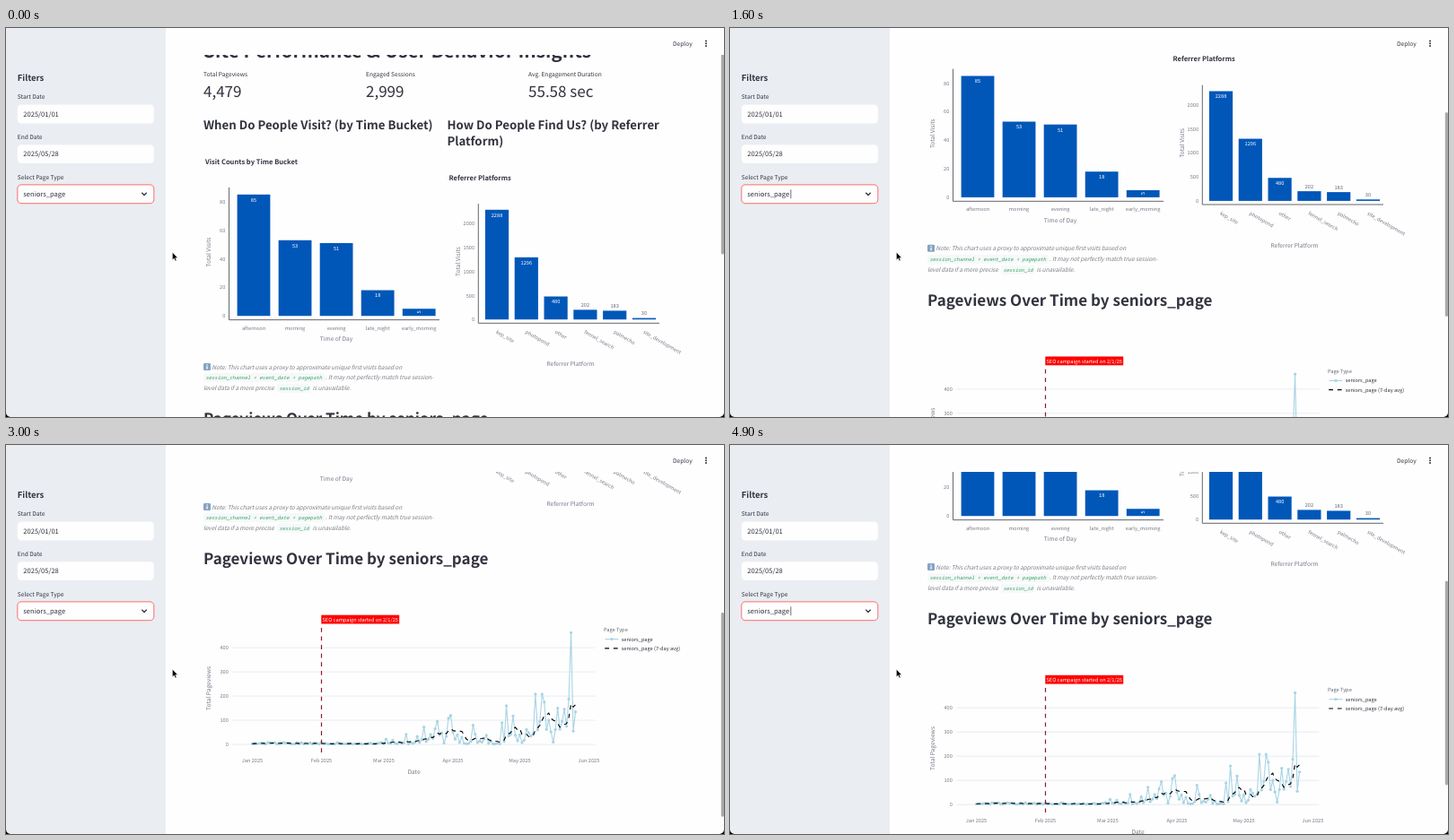
These frames come from a looping animation (800 by 434 pixels, 5 s). An HTML page:

```html
<!DOCTYPE html>
<html lang="en">
<head>
<meta charset="utf-8">
<title>Page analytics dashboard</title>
<style>
  html, body { margin: 0; width: 100%; height: 100%; overflow: hidden; background: #fff; }
  svg { display: block; width: 100vw; height: 100vh; }
  text {
    font-family: "Noto Sans CJK JP", "Noto Sans CJK SC", "Noto Sans CJK", "Open Sans", sans-serif;
    text-rendering: geometricPrecision;
    white-space: pre;
  }
  .note { font-style: italic; letter-spacing: -0.016em; }
  .code { font-family: "Noto Sans Mono", "Liberation Mono", monospace; font-style: italic; }
</style>
</head>
<body>
<svg id="stage" viewBox="0 0 800 434" xmlns="http://www.w3.org/2000/svg"></svg>
<script>
const NS = "http://www.w3.org/2000/svg";
const stage = document.getElementById("stage");
const INK = "#31333f", GRAY = "#767a88", BLUE = "#0057b8", SKY = "#a8d4e5";
const LOOP = 5000, STEP = 100;

// Type sizes in stage pixels
const XS = 6.35, SM = 7.41, MD = 8.47, LG = 10.6, H3 = 14.8, H2 = 19.05, H1 = 23.3;
const GLYPH_SCALE = 1.118;

function add(parent, tag, attrs) {
  const el = document.createElementNS(NS, tag);
  for (const key in attrs) el.setAttribute(key, attrs[key]);
  parent.appendChild(el);
  return el;
}

// Text placed by the vertical middle of its capitals
function label(parent, x, mid, str, size, opts = {}) {
  const { turn, ...rest } = opts;
  const y = mid + size * 0.33;
  const attrs = { x, y, "font-size": size / GLYPH_SCALE, fill: INK, ...rest };
  if (turn) attrs.transform = `rotate(${turn} ${x} ${mid})`;
  add(parent, "text", attrs).textContent = str;
}

const rect = (parent, x, y, width, height, fill, more) =>
  add(parent, "rect", { x, y, width, height, fill, ...more });

const stroke = (parent, d, color, width, more) =>
  add(parent, "path", { d, fill: "none", stroke: color, "stroke-width": width, ...more });

const bold = { "font-weight": 600 };
const heavy = { "font-weight": 700 };
const tick = { fill: GRAY, "text-anchor": "end" };
const axis = { fill: GRAY, "text-anchor": "middle" };

rect(stage, 0, 0, 800, 434, "#fefefe");
const page = add(stage, "g", {});

function drawMetrics() {
  label(page, 220, 25.8, "Site Performance & User Behavior Insights", H1, heavy);
  const metrics = [
    ["Total Pageviews", "4,479"],
    ["Engaged Sessions", "2,999"],
    ["Avg. Engagement Duration", "55.58 sec"]
  ];
  metrics.forEach(([name, value], i) => {
    label(page, 220 + i * 181, 52, name, SM);
    label(page, 220 + i * 181, 71, value, H2);
  });
}

function drawBars(c) {
  const topOf = v => c.zero - v * c.unit;
  c.bars.forEach(([name, value], i) => {
    const mid = c.first + i * c.step, top = topOf(value);
    rect(page, mid - c.width / 2, top, c.width, c.zero - top, BLUE);
    const outside = c.slant && value < 400;
    const narrow = !c.slant && value < 10;
    label(page, mid, narrow ? c.zero - 4.4 : top + (outside ? -5.3 : 5.8), value, XS, {
      fill: outside ? "#656874" : "#fff",
      "text-anchor": "middle",
      turn: narrow ? -90 : 0
    });
    if (c.slant) {
      label(page, mid - 0.5, 338.4, name, XS, { fill: GRAY, turn: 30 });
    } else {
      label(page, mid, 334.6, name, XS, axis);
    }
  });
  for (let v = 0; v <= c.maxTick; v += c.tickStep) {
    label(page, c.left - 4.2, topOf(v), v, XS, tick);
  }
  stroke(page, `M${c.left} ${c.top}V${c.base}H${c.right}`, "#55565c", 0.9);
  label(page, c.titleX, c.titleY, c.title, MD, heavy);
  label(page, c.left - 23, c.nameY, "Total Visits", SM, { ...axis, turn: -90 });
  label(page, c.axisX, c.axisY, c.axisName, SM, axis);
}

function drawVisits() {
  label(page, 220, 108, "When Do People Visit? (by Time Bucket)", H3, bold);
  drawBars({
    bars: [["afternoon", 85], ["morning", 53], ["evening", 51], ["late_night", 18], ["early_morning", 5]],
    zero: 321.2, unit: 1.593, first: 276, step: 46.05, width: 36.8,
    left: 248.5, right: 483, top: 178, base: 325.6, maxTick: 80, tickStep: 20,
    title: "Visit Counts by Time Bucket", titleX: 222, titleY: 149,
    nameY: 250, axisName: "Time of Day", axisX: 368, axisY: 347
  });
}

function drawReferrers() {
  label(page, 491.5, 108, "How Do People Find Us? (by Referrer", H3, bold);
  label(page, 491.5, 125.8, "Platform)", H3, bold);
  drawBars({
    bars: [["kep_site", 2288], ["photopond", 1296], ["other", 480],
           ["fennel_search", 202], ["palmecho", 183], ["site_development", 30]],
    zero: 325.2, unit: 0.0535, first: 547, step: 32.8, width: 26.2, slant: true,
    left: 526.3, right: 728, top: 196, base: 329.3, maxTick: 2000, tickStep: 500,
    title: "Referrer Platforms", titleX: 493.5, titleY: 166.8,
    nameY: 260.5, axisName: "Referrer Platform", axisX: 629, axisY: 374.4
  });
}

function drawNote() {
  const note = (x, y, str) => label(page, x, y, str, SM, { class: "note", fill: "#7f818b" });
  const code = (x, y, width, str) => {
    rect(page, x, y - 5, width, 10, "#f6f8f9", { rx: 2 });
    label(page, x + 2.4, y + 0.2, str, 5.55 * GLYPH_SCALE, { class: "code", fill: "#34a562" });
  };
  rect(page, 220, 374, 8, 8, "#86a3c3", { rx: 1.2 });
  rect(page, 223.4, 377.4, 1.3, 3.2, "#fff");
  rect(page, 223.4, 375.4, 1.3, 1.2, "#fff");
  note(229.3, 378.2, "Note: This chart uses a proxy to approximate unique first visits based on");
  code(220, 390, 135, "session_channel + event_date + pagepath");
  note(355.8, 390, ". It may not perfectly match true session-");
  note(220, 401.7, "level data if a more precise");
  code(302, 401.7, 37.5, "session_id");
  note(341.5, 401.7, "is unavailable.");
}

// Daily pageviews: a quiet start, then readings from March on
function dailyViews() {
  const views = [];
  for (let d = 0; d < 59; d++) {
    const n = Math.sin(d * 12.9898 + 4) * 43758.5453;
    const r = n - Math.floor(n);
    views.push(1.5 + 7 * r * r);
  }
  return views.concat([
    3, 22, 6, 4, 18, 5, 3, 10, 4, 6, 42, 3, 8, 4, 9, 33, 8, 20, 72, 12,
    22, 42, 25, 65, 95, 40, 48, 6, 34, 108, 120, 50, 22, 40, 8, 30, 5, 3, 4, 12,
    80, 42, 8, 14, 10, 22, 38, 4, 14, 2, 3, 5, 3, 90, 12, 160, 35, 42, 118, 38,
    15, 40, 8, 18, 62, 48, 35, 45, 208, 60, 95, 208, 175, 62, 100, 52, 10, 62, 150, 63,
    95, 146, 75, 187, 462, 55, 135
  ]);
}

function rollingMean(list, span) {
  return list.map((_, i) => {
    const part = list.slice(Math.max(0, i - span + 1), i + 1);
    return part.reduce((a, b) => a + b, 0) / part.length;
  });
}

function drawTimeline() {
  const zero = 643.2;
  const px = d => 274.5 + d * 2.483;
  const py = v => zero - v * 0.27;
  const trace = list => "M" + list.map((v, d) => `${px(d).toFixed(2)} ${py(v).toFixed(2)}`).join("L");
  const dash = { "stroke-dasharray": "4.8 4.8" };

  label(page, 220, 436.2, "Pageviews Over Time by seniors_page", H2, bold);
  for (let v = 0; v <= 400; v += 100) {
    stroke(page, `M252 ${py(v)}H656.5`, "#e4e6ec", 0.8);
    label(page, 247.8, py(v), v, XS, tick);
  }
  const months = { Jan: 0, Feb: 31, Mar: 59, Apr: 90, May: 120, Jun: 151 };
  for (const m in months) label(page, px(months[m]), 661, `${m} 2025`, XS, axis);
  label(page, 454.5, 674, "Date", SM, axis);
  label(page, 225.5, 580.5, "Total Pageviews", SM, { ...axis, turn: -90 });

  const views = dailyViews();
  stroke(page, trace(views), SKY, 1.1, { "stroke-linejoin": "round" });
  views.forEach((v, d) => add(page, "circle", { cx: px(d), cy: py(v), r: 1.6, fill: SKY }));
  stroke(page, trace(rollingMean(views, 7)), "#000", 1.15, dash);

  stroke(page, "M351.5 513V652", "#8f1a2a", 1.2, dash);
  rect(page, 351.3, 498.8, 86.9, 9.8, "#f00");
  label(page, 394.7, 503.8, "SEO campaign started on 2/1/25", XS, { fill: "#fff", "text-anchor": "middle" });

  label(page, 666, 515.2, "Page Type", XS, { fill: "#62656f" });
  stroke(page, "M667.5 525.7H682.5", SKY, 1.1);
  add(page, "circle", { cx: 675, cy: 525.7, r: 1.6, fill: SKY });
  label(page, 685.7, 525.7, "seniors_page", XS);
  stroke(page, "M667.2 536H682.5", "#000", 1.2, dash);
  label(page, 685.7, 536, "seniors_page (7-day avg)", XS);
}

function drawHeader() {
  rect(stage, 178, 0, 622, 30, "#fefefe");
  label(stage, 743, 17.4, "Deploy", SM);
  for (let i = -1; i <= 1; i++) {
    add(stage, "circle", { cx: 780, cy: 17.2 + i * 2.8, r: 1, fill: INK });
  }
}

function drawSidebar() {
  rect(stage, 0, 0, 178, 434, "#eaedf2");
  label(stage, 12.8, 55.8, "Filters", LG, bold);
  const fields = [
    ["Start Date", "2025/01/01", 96],
    ["End Date", "2025/05/28", 140.6],
    ["Select Page Type", "seniors_page", 185.3]
  ];
  fields.forEach(([name, value, y], i) => {
    const picked = i === 2;
    label(stage, 12.8, y - 19.2, name, SM);
    rect(stage, 12.8, y - 10.4, 152, 20.8, "#fefefe", {
      rx: 4.2, stroke: picked ? "#ff4b4b" : "none", "stroke-width": 0.8
    });
    label(stage, 19.3, y + 0.1, value, MD);
  });
  stroke(stage, "M151.3 183.8l2.7 2.7 2.7-2.7", INK, 1.3);
}

function drawPointer() {
  add(stage, "path", {
    d: "M185.4 250.2v8.6l2-1.8 1.3 2.9 1.4-.6-1.3-2.8h2.6z",
    fill: "#000", stroke: "#fff", "stroke-width": 0.5
  });
}

drawMetrics();
drawVisits();
drawReferrers();
drawNote();
drawTimeline();
const thumb = rect(stage, 796.8, 0, 3.2, 228, "#a9a9ab", { rx: 1.6 });
drawHeader();
drawSidebar();
const caret = stroke(stage, "M67.8 180.3V190.2", INK, 0.7);
drawPointer();
add(stage, "path", { d: "M0 429V434H5A5 5 0 0 1 0 429M800 429V434H795A5 5 0 0 0 800 429", fill: "#000" });

// Scroll offset over time: [ms, px]
const scrollKeys = [
  [0, 0], [900, 81], [1600, 132.3], [2400, 247], [2600, 269.3],
  [3200, 329], [4400, 329], [4500, 324], [4900, 242]
];

function scrollAt(t) {
  for (let i = 1; i < scrollKeys.length; i++) {
    const [t0, s0] = scrollKeys[i - 1], [t1, s1] = scrollKeys[i];
    if (t <= t1) return s0 + (s1 - s0) * (t - t0) / (t1 - t0);
  }
  return scrollKeys[scrollKeys.length - 1][1];
}

function render(ms) {
  const t = Math.floor((ms % LOOP) / STEP) * STEP;
  const scroll = scrollAt(t);
  page.setAttribute("transform", `translate(0 ${-scroll})`);
  thumb.setAttribute("y", 24.5 + scroll * 0.525);
  caret.setAttribute("visibility", t % 1000 >= 500 ? "visible" : "hidden");
}

function tickFrame() {
  render(performance.now());
  requestAnimationFrame(tickFrame);
}
tickFrame();
</script>
</body>
</html>
```
